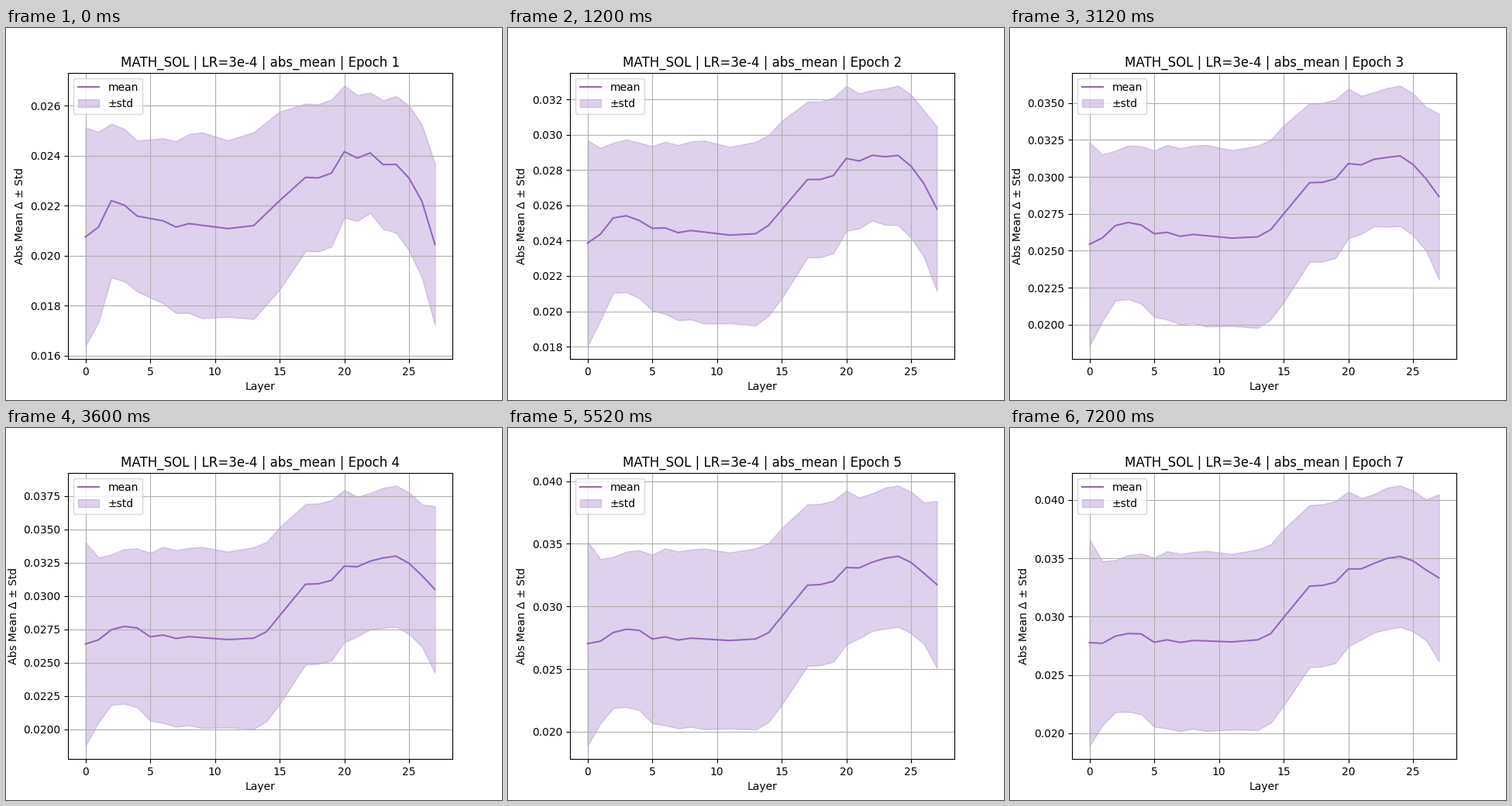
A matplotlib script for the animation above (8000 ms loop, 640 by 480 pixels).

```python
import numpy as np
import matplotlib.pyplot as plt
from matplotlib.animation import FuncAnimation

STEP_MS = 400
STEPS = 20
STEPS_PER_EPOCH = 3
LAST_EPOCH = 7
COLOR = "tab:purple"

layers = np.arange(28)


def profile(points):
    """Piecewise linear curve over the layers through {layer: value}."""
    return np.interp(layers, list(points), list(points.values()))


# Values at the first epoch and their growth up to the last, in units of 1e-5.
mean_start = profile({0: 2075, 1: 2114, 2: 2220, 3: 2202, 4: 2158, 6: 2139, 7: 2114,
                      8: 2128, 11: 2108, 13: 2120, 15: 2220, 17: 2313, 18: 2311,
                      19: 2330, 20: 2416, 21: 2390, 22: 2411, 23: 2364, 24: 2365,
                      25: 2310, 26: 2217, 27: 2045})
mean_gain = profile({0: 702, 2: 613, 4: 694, 5: 632, 6: 662, 14: 684, 17: 948,
                     19: 965, 22: 1046, 23: 1135, 26: 1184, 27: 1287})
std_start = profile({0: 437, 1: 381, 2: 308, 4: 302, 9: 372, 11: 353, 13: 374,
                     15: 356, 17: 295, 19: 294, 20: 264, 22: 241, 27: 323})
std_gain = profile({0: 449, 1: 322, 6: 430, 8: 400, 20: 400, 21: 354, 23: 350,
                    26: 296, 27: 393})

# How much faster than a pure logarithm each layer grows.
mean_bend = profile({0: 0.42, 1: 0.63, 3: 0.75, 15: 0.49, 24: 0.45, 27: 0.3})
std_bend = profile({0: -0.01, 5: 0.17})


def growth(epoch, bend, skew):
    """Share of the total growth reached: 0 at the first epoch, 1 at the last."""
    u = np.log(epoch) / np.log(LAST_EPOCH)
    return u + u * (1 - u) * (bend + skew * (u - 0.565))


def stats(epoch):
    mean = mean_start + mean_gain * growth(epoch, mean_bend, 0.2)
    std = std_start + std_gain * growth(epoch, std_bend, 0.6)
    return mean * 1e-5, std * 1e-5


fig, ax = plt.subplots(figsize=(6.4, 4.8), dpi=100)


def draw(step):
    epoch = step // STEPS_PER_EPOCH + 1
    mean, std = stats(epoch)
    ax.clear()
    ax.plot(layers, mean, color=COLOR, label="mean")
    ax.fill_between(layers, mean - std, mean + std, color=COLOR, alpha=0.3, label="±std")
    ax.set_title(f"MATH_SOL | LR=3e-4 | abs_mean | Epoch {epoch}")
    ax.set_xlabel("Layer")
    ax.set_ylabel("Abs Mean Δ ± Std")
    ax.grid(True)
    ax.legend(loc="upper left")
    return []


anim = FuncAnimation(fig, draw, frames=STEPS, init_func=lambda: draw(0),
                     interval=STEP_MS, repeat=True, repeat_delay=0)
plt.show()
```
